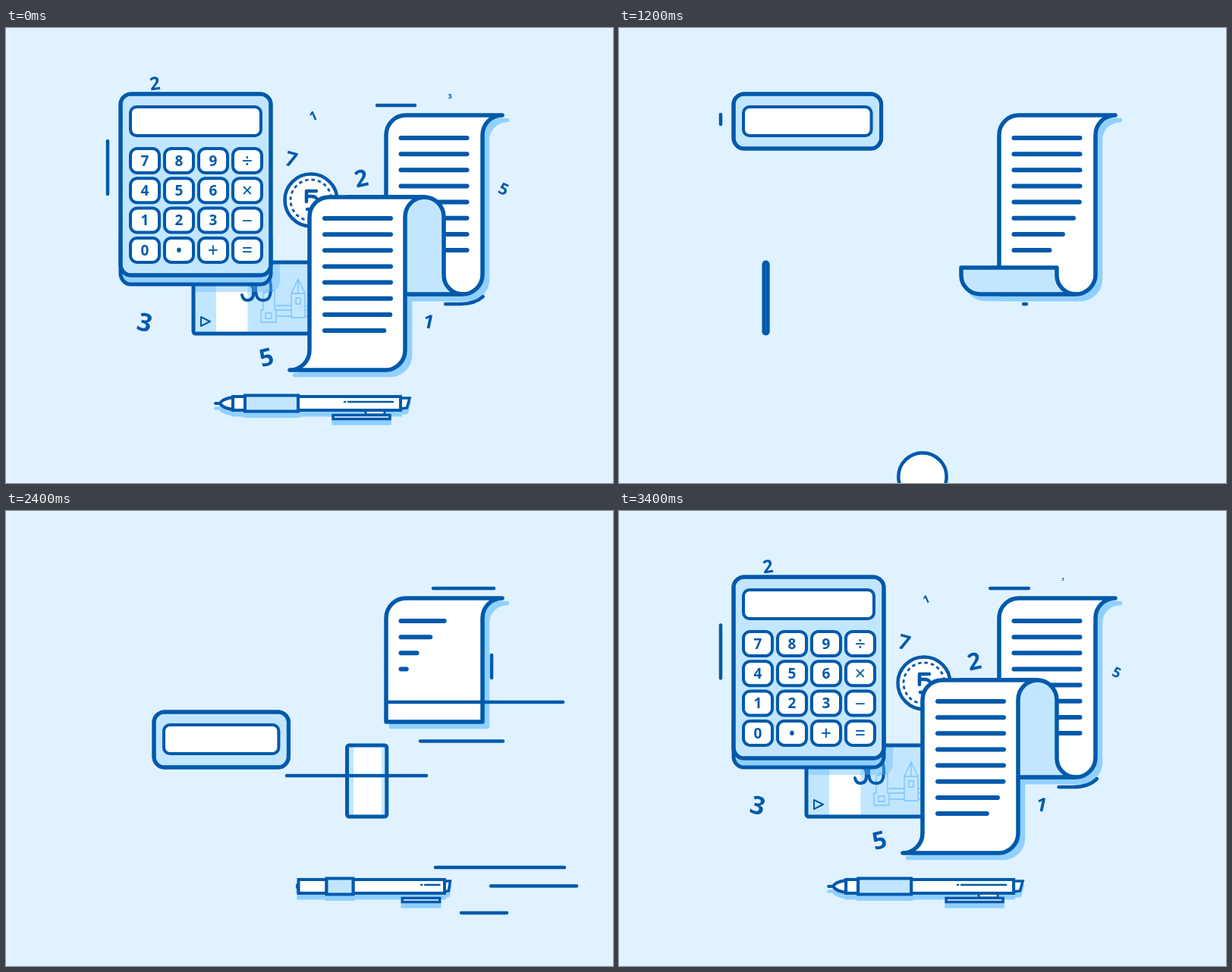
Recreate the animation shown at these times as an HTML page with a canvas. Size 800 px wide and 600 px high, loop 3.44 s.

```html
<!DOCTYPE html>
<html lang="en">
<head>
<meta charset="utf-8">
<title>Accounting loop</title>
<style>
html, body { margin: 0; width: 100%; height: 100%; overflow: hidden; background: #e0f2ff; }
canvas { display: block; width: 800px; height: 600px; }
</style>
</head>
<body>
<canvas id="stage" width="800" height="600"></canvas>
<script>
const c = document.getElementById('stage').getContext('2d');
const LOOP = 3440, STEP = 40;
const BG = '#e0f2ff', INK = '#0059ab', PALE = '#c2e6ff', SHADE = '#90d0ff', WHITE = '#fff';
const FONT = '"Noto Sans", "Open Sans", sans-serif';

// T runs from the empty stage (1720) through the build-up to the next empty stage (5160).
let T = 0, leaving = false;

const clamp = (v, a = 0, b = 1) => Math.min(b, Math.max(a, v));
const lerp = (a, b, k) => a + (b - a) * k;
const lin = (a, b) => clamp((T - a) / (b - a));
const ss = (a, b) => { const k = lin(a, b); return k * k * (3 - 2 * k); };
const out = (a, b) => ss(a + LOOP, b + LOOP);
const vis = (i0, i1, o0, o1) => ss(i0, i1) * (1 - out(o0, o1));

// Interpolates rows of [time, value, value...]; null outside of them.
function track(rows) {
  for (let i = 1; i < rows.length; i++) {
    const p = rows[i - 1], q = rows[i];
    if (T >= p[0] && T < q[0]) {
      const k = (T - p[0]) / (q[0] - p[0]);
      return p.slice(1).map((v, j) => lerp(v, q[j + 1], k));
    }
  }
  return null;
}

function paint(path, fill, width, ink = INK) {
  if (fill) { c.fillStyle = fill; c.fill(path); }
  if (width) { c.strokeStyle = ink; c.lineWidth = width; c.stroke(path); }
}

function box(x, y, w, h, r, fill, width, ink) {
  if (w <= 0 || h <= 0) return;
  const p = new Path2D();
  p.roundRect(x, y, w, h, r);
  paint(p, fill, width, ink);
}

function line(x1, y1, x2, y2, width, ink) {
  const p = new Path2D();
  p.moveTo(x1, y1);
  p.lineTo(x2, y2);
  paint(p, null, width, ink);
}

function trim(path, a, b, width) {
  if (b - a < 0.5) return;
  c.setLineDash([b - a, 9999]);
  c.lineDashOffset = -a;
  paint(path, null, width);
  c.setLineDash([]);
}

function glyph(ch, x, y, size, turn = 0, weight = 700) {
  if (size < 1) return;
  c.save();
  c.translate(x, y);
  c.rotate(turn * Math.PI / 180);
  c.fillStyle = INK;
  c.font = `${weight} ${size}px ${FONT}`;
  c.fillText(ch, 0, size * 0.357);
  c.restore();
}

/* Calculator */

const KEYS = ['789÷', '456×', '123−', '0•+='];
const KEY_START = [-11, 5, 15, 26];

function calcFrame() {
  const top = lerp(265, 87, ss(2480, 2880));
  const bottom = leaving ? lerp(326, 159, out(860, 1160)) : lerp(338, 326, ss(2880, 3080));
  const base = bottom + 12 * vis(2880, 3080, 400, 700);
  return { x: lerp(276, 151, ss(2160, 2560)), top, bottom, base, w: 198 * vis(2160, 2460, 1160, 1675) };
}

// Walks clockwise round a 38 x 32 rounded box from its top left corner.
function keyPoint(s) {
  const w = 38, h = 32, r = 9;
  s = (s + 140) % 140;
  let x, y;
  if (s < w) [x, y] = [s, 0];
  else if (s < w + h) [x, y] = [w, s - w];
  else if (s < 2 * w + h) [x, y] = [2 * w + h - s, h];
  else [x, y] = [0, 140 - s];
  const cx = clamp(x, r, w - r), cy = clamp(y, r, h - r);
  const d = Math.hypot(x - cx, y - cy) || 1;
  return [cx + (x - cx) / d * r, cy + (y - cy) / d * r];
}

function key(x, y, start, part) {
  if (part < 0.02) return;
  const p = new Path2D(), n = 80;
  for (let i = 0; i <= n; i++) {
    const [px, py] = keyPoint(start + 140 * part * i / n);
    p.lineTo(x + px, y + py);
  }
  if (part > 0.995) p.closePath();
  c.globalAlpha = part;
  paint(p, WHITE);
  c.globalAlpha = 1;
  paint(p, null, 4);
}

function calculator() {
  const { x, top, bottom, base, w } = calcFrame();
  if (w < 2) return;
  if (base > bottom + 0.5) box(x, bottom - 60, w, base - bottom + 60, 14, SHADE, 5);
  box(x, top, w, bottom - top, 14, PALE, 5);
  box(x + 13, top + 17, w - 26, 38, 8, WHITE, 4);

  c.save();
  c.beginPath();
  c.roundRect(x, top, w, bottom - top, 14);
  c.clip();
  KEYS.forEach((row, r) => {
    const i0 = 2540 + 55 * r, o1 = 1069 - 24 * r;
    const part = vis(i0, i0 + 400, o1 - 360, o1);
    const size = vis(2800 + 55 * r, 3050 + 55 * r, 640 - 40 * r, 1000 - 40 * r);
    [...row].forEach((ch, i) => {
      const kx = 164 + 45 * i, ky = top + 72 + 39.3 * r;
      key(kx, ky, KEY_START[r % 2 ? 3 - i : i], part);
      const digit = /\d/.test(ch);
      glyph(ch, kx + 19, ky + 16, (digit ? 19 : 25) * size, 0, digit ? 700 : 500);
    });
  });
  c.restore();
  box(x, top, w, bottom - top, 14, null, 5);
}

/* Banknote */

const FIVE = new Path2D('M311 352C312 357 314 359 318 359C323 359 326 356 326 350V347C326 341 323 337 317 337H313V318H327');
const ZERO = new Path2D('M339 327C346 327 349 331 349 343S346 359 339 359S329 355 329 343S332 327 339 327');
const PLAY = new Path2D('M257 381L269 387L257 393Z');
const CASTLE = new Path2D('M336 388V372H339V349H343V346H346V349H349V346H354V372H356V388Z' +
  'M342 376H350V383H342ZM356 366H376M356 372H376M356 380H376M376 382V350H394V382Z' +
  'M376 350L385 331L394 350M385 331V350M382 356H388V364H382ZM394 366H408M394 372H408' +
  'M394 380H408M408 382V352H427V382ZM408 352L417 337L427 352M414 360H420V368H414Z');

function note() {
  const w = 183 * vis(2280, 2620, 753, 1250);
  if (w < 0.5) return;
  const x = leaving ? lerp(247, 190, out(600, 1250)) : lerp(500, 247, ss(2248, 2778));
  const from = lerp(0.164, 0.02, out(600, 1000));
  const to = leaving ? 0.39 - 0.02 * out(600, 1000) : lerp(0.9, 0.39, ss(2300, 3050));

  c.save();
  c.beginPath();
  c.roundRect(x, 309, w, 94, 3);
  c.clip();
  c.fillStyle = PALE;
  c.fillRect(x, 309, w, 94);
  c.fillStyle = WHITE;
  c.fillRect(x + w * from, 309, w * (to - from), 94);

  c.save();
  if (leaving) c.translate(x - 247, 0);
  c.globalAlpha = vis(2600, 3000, 450, 920);
  paint(CASTLE, null, 1.3, '#78c2ff');
  c.globalAlpha = 1;
  const sum = vis(2500, 2960, 560, 1060);
  trim(FIVE, 0, 90 * sum, 4);
  trim(ZERO, 0, 90 * sum, 4);
  trim(PLAY, 0, 42 * vis(2820, 3080, 350, 700), 2);
  c.restore();

  const k = calcFrame();
  box(k.x, k.top, k.w + 12, k.base - k.top + 10, 14, 'rgba(95,185,255,.4)');
  c.restore();
  box(x, 309, w, 94, 3, null, 5);
}

/* Coin */

function coin() {
  if (T < 2560) return;
  const drop = out(890, 1320);
  const y = leaving ? 227 - 32 * out(560, 840) + 490 * drop : lerp(-60, 227, ss(2560, 3000));
  if (y > 640) return;
  c.save();
  c.translate(402 - 2.5 * drop, y);
  const disc = new Path2D(), dots = new Path2D();
  disc.arc(0, 0, 34.5 - 3.5 * drop, -Math.PI / 2, Math.PI * 1.5);
  dots.arc(0, 0, 27, 0, Math.PI * 2);
  paint(disc, WHITE);
  trim(disc, 0, 217 * ss(2740, 3000), 4.5);

  c.globalAlpha = vis(2840, 3050, 900, 1080);
  c.setLineDash([4.5, 27 * Math.PI * 2 / 20 - 4.5]);
  c.lineCap = 'butt';
  paint(dots, null, 2.8);
  c.lineCap = 'round';
  c.globalAlpha = 1;
  const mark = vis(2880, 3120, 620, 1080);
  trim(new Path2D('M7 -12H-6V2'), 0, 28 * Math.min(1, mark * 2), 4.5);
  trim(new Path2D('M-6 -5H1C12 -5 12 12 1 12H-5'), 0, 42 * mark, 4.5);
  c.restore();
}

/* Receipt: three runs of paper, 236 + 128 + 228 long */

function backSheet(len) {
  const p = new Path2D(), full = len >= 236;
  const y = Math.min(115 + len, 351), r = Math.min(26, len);
  p.moveTo(628 + r, 115);
  p.arcTo(501, 115, 501, y, r);
  p.lineTo(501, y);
  p.arcTo(628, y, 628, 115 + r, full ? 26 : 0);
  p.arcTo(628, 115, 628 + r, 115, r);
  p.closePath();
  return p;
}

function innerSheet(len) {
  const p = new Path2D(), top = 351 - len, r = Math.min(25, len), arch = clamp(249 - top, 0, 26);
  p.moveTo(577, top + arch);
  p.arcTo(577, top, 451, top, arch);
  p.lineTo(451, top);
  p.arcTo(451, 351, 602, 351, r);
  p.lineTo(602, 351);
  p.arcTo(577, 351, 577, top, r);
  p.closePath();
  return p;
}

function frontSheet(len) {
  const p = new Path2D(), y = Math.min(223 + len, 451);
  const r = Math.min(26, len), curl = clamp(y - 425, 0, 26);
  p.moveTo(526 + r, 223);
  p.arcTo(400, 223, 400, y, r);
  p.arcTo(400, y, 374, y, curl);
  p.lineTo(400 - curl, y);
  p.arcTo(526, y, 526, 223, curl);
  p.arcTo(526, 223, 526 + r, 223, r);
  p.closePath();
  return p;
}

function textLines(x, y, late) {
  for (let i = 0; i < 8; i++) {
    const i0 = 2218 + late + 43 * i, o1 = 1652 - late - 42 * i;
    const w = 87 * vis(i0, i0 + 300, o1 - 300, o1);
    if (w > 0.5) line(x, y + 21.15 * i, x + w, y + 21.15 * i, 6);
  }
}

function receipt() {
  const run = track([[2160, 0], [2400, 163], [2720, 298], [3200, 592], [LOOP + 600, 592],
    [LOOP + 840, 474], [LOOP + 1200, 271], [LOOP + 1520, 117], [LOOP + 1720, 0]]);
  if (!run || run[0] <= 0) return;
  const len = run[0], sheets = [[backSheet(len), WHITE]];
  if (len > 236) sheets.push([innerSheet(Math.min(len - 236, 128)), PALE]);
  if (len > 364) sheets.push([frontSheet(len - 364), WHITE]);

  c.save();
  c.translate(6.5, 6.5);
  for (const [p] of sheets) paint(p, SHADE, 5.5, SHADE);
  c.restore();
  sheets.forEach(([p, fill], i) => {
    paint(p, fill, 5.5);
    if (i === 0) textLines(520.5, 145, 0);
    if (i === 2) textLines(420, 251, 680);
  });
}

/* Pen */

function penParts(x, sec, grip, barrel, p, ink, white, pale) {
  const g = x + sec, b = g + grip, end = b + barrel;
  const tip = clamp((p - 0.45) / 0.5), cap = 12 * clamp(p * 1.25);
  if (tip > 0) {
    const t = new Path2D(), n = x - 17 * tip, h = 8 * clamp(tip * 4);
    if (tip > 0.6) line(n - 6, 495, n, 495, 4, ink);
    t.moveTo(x, 495 - h);
    t.quadraticCurveTo(n + 3 * tip, 495 - h * 0.75, n, 495);
    t.quadraticCurveTo(n + 3 * tip, 495 + h * 0.75, x, 495 + h);
    t.closePath();
    c.lineJoin = 'round';
    paint(t, white, 4, ink);
    c.lineJoin = 'miter';
  }
  const lid = new Path2D();
  lid.moveTo(end, 488);
  lid.lineTo(end + cap, 488);
  lid.lineTo(end + cap * 0.7, 501);
  lid.lineTo(end, 502);
  lid.closePath();
  paint(lid, white, 3.5, ink);
  const clip = Math.min(75 * Math.pow(p, 0.6), barrel), right = end - 14 * clamp(p * 1.2 - 0.15);
  if (p > 0.8) box(end - 46, 504, 25, 6, 0, white, 3, ink);
  box(right - clip, 510.5, clip, 5, 0, white, 3.5, ink);
  box(x, 486, sec, 18, 0, white, 4, ink);
  box(b, 486, barrel, 18, 0, white, 4, ink);
  box(g, 484.5, grip, 21, 0, pale, 4, ink);
}

function pen() {
  const size = vis(2160, 2360, 840, 1090);
  if (size < 0.02) return;
  const p = vis(2220, 2580, 480, 953);
  const right = leaving ? lerp(520, 146, out(560, 1120)) : 520 + 240 * Math.exp((2160 - T) / 169);
  const sec = (16 + (leaving ? 12 : 42) * (1 - p)) * size;
  const grip = 70 * p * size, barrel = lerp(106, 135, p) * size;
  const x = right - sec - grip - barrel;

  c.lineJoin = 'miter';
  c.save();
  c.translate(0, 6.5);
  penParts(x, sec, grip, barrel, p, SHADE, SHADE, SHADE);
  c.restore();
  penParts(x, sec, grip, barrel, p, INK, WHITE, PALE);
  c.lineJoin = 'round';
  if (size > 0.7) {
    const m = lerp(0.1, 1, p * p);
    const mx = right - 10 - 64 * m;
    line(mx, 493, mx + 1, 493, 2.6);
    line(mx + 5, 493, mx + 5 + 59 * m, 493, 2.6);
  }
}

/* Speed lines */

const BEND = new Path2D('M640 140V322Q640 364 598 364H520');
const STREAKS = [
  ['h', 102, [[2240, 760, 800], [2400, 563, 643], [2720, 494, 555], [3440, 489, 539], [4280, 445, 453], [4340, 443, 443]]],
  ['v', 134, [[2560, 450, 450], [2720, 345, 408], [3000, 165, 235], [3440, 149, 219], [4280, 132, 174], [4640, 114, 127], [4700, 112, 112]]],
  ['h', 252, [[2200, 800, 800], [2400, 503, 734], [2600, 503, 503]]],
  ['h', 303.5, [[2240, 800, 800], [2400, 546, 655], [2720, 373, 441], [2880, 350, 350]]],
  ['h', 349, [[2200, 800, 800], [2400, 370, 554], [2720, 250, 258], [2760, 246, 246]]],
  ['h', 470, [[2200, 800, 800], [2400, 566, 736], [2720, 399, 437], [2840, 375, 375]]],
  ['h', 494.5, [[2200, 800, 800], [2400, 639, 752], [2720, 564, 569], [2760, 560, 560]]],
  ['h', 530, [[2280, 700, 700], [2400, 600, 660], [2720, 502, 540], [2880, 480, 480]]],
  ['v', 367, [[2640, -80, -40], [2720, -50, 10], [2880, 110, 150], [2960, 170, 170]]]
];

function streaks() {
  for (const [dir, at, rows] of STREAKS) {
    const s = track(rows);
    if (!s) continue;
    if (dir === 'h') line(s[0], at, s[1], at, 4.5);
    else line(at, s[0], at, s[1], 4.5);
  }
  const s = track([[2320, 20, 20], [2400, 50, 80], [2720, 152, 224], [3000, 200, 264],
    [3440, 217, 269], [4280, 285, 303], [4640, 311, 315], [4700, 316, 316]]);
  if (s) trim(BEND, s[0], s[1], 4.5);
}

/* Floating digits: sign, x, y, size, turn, start, end */

const DIGITS = [
  ['2', 196, 73, 24, -8, 2595, 500],
  ['7', 376, 173, 27, 15, 2800, 450],
  ['2', 468, 198, 31, -12, 2850, 450],
  ['3', 183, 388, 33, 15, 2900, 500],
  ['5', 343, 434, 32, -14, 2940, 520],
  ['1', 557, 387, 25, 12, 3000, 520],
  ['5', 656, 212, 23, 25, 3136, 600],
  ['1', 405, 115, 22, -24, 3185, 640],
  ['3', 585, 87, 25, 0, 3320, 920],
  ['1', 94, 231, 27, -14, 3620, 1010],
  ['7', 275, 438, 24, 12, 3680, 1030]
];

function digits() {
  for (const [ch, x, y, size, turn, start, end] of DIGITS) {
    const k = lin(start, start + 330);
    c.globalAlpha = 1 - lin(LOOP + end - 160, LOOP + end);
    if (c.globalAlpha > 0) glyph(ch, x, y + 4 * (1 - k), size * k, turn);
  }
  c.globalAlpha = 1;
}

function draw(now) {
  const t = Math.floor((now % LOOP) / STEP) * STEP;
  leaving = t <= 1720;
  T = leaving ? t + LOOP : t;
  c.fillStyle = BG;
  c.fillRect(0, 0, 800, 600);
  c.lineCap = c.lineJoin = 'round';
  c.textAlign = 'center';
  note();
  coin();
  receipt();
  calculator();
  pen();
  streaks();
  digits();
}

let began = null;
function tick(now) {
  if (began === null) began = now;
  draw(now - began);
  requestAnimationFrame(tick);
}
draw(0);
requestAnimationFrame(tick);
</script>
</body>
</html>
```
